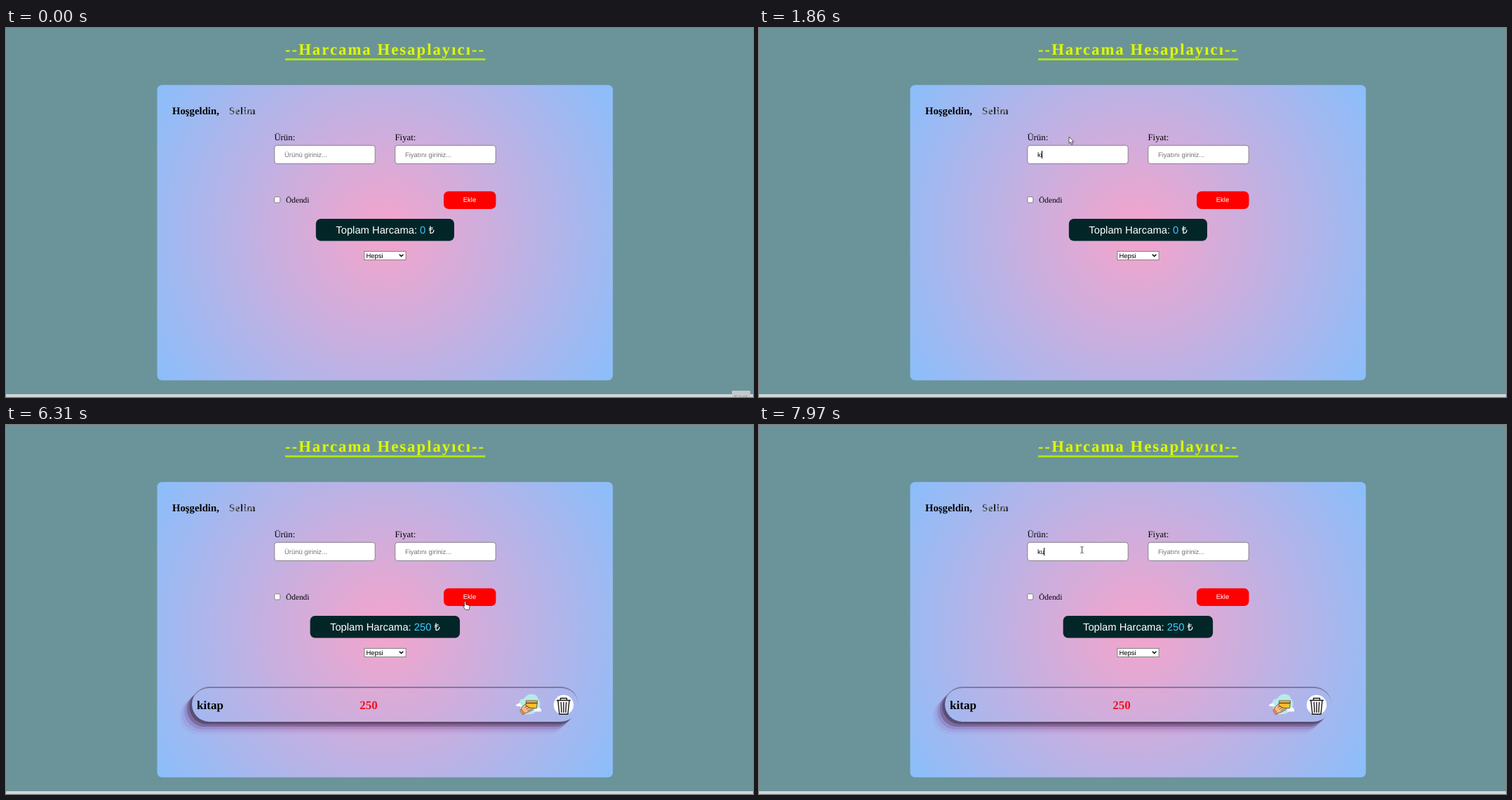
An HTML page for the animation above (8000 ms loop, 1065 by 526 pixels).

```html
<!DOCTYPE html>
<html lang="tr">
<head>
<meta charset="utf-8">
<title>Harcama Hesaplayıcı</title>
<style>
  html, body { margin: 0; width: 100%; height: 100%; overflow: hidden; background: #6a9499; }
  svg { position: absolute; left: 0; top: 0; }
  text { white-space: pre; text-rendering: geometricPrecision; }
  .serif { font-family: "Liberation Serif", "Times New Roman", serif; }
  .sans { font-family: "Liberation Sans", Arial, sans-serif; font-size: 9.46px; }
  .menu { font-family: "Open Sans", "Noto Sans", sans-serif; font-size: 8.5px; fill: #3a3a3a; }
  .bold { font-weight: bold; }
  .title { text-shadow: 0 0 5px rgba(165, 180, 70, .4); }
  .field { fill: #fff; stroke: #7b7681; stroke-width: .9; }
  .hint { fill: #757575; }
  #pill {
    position: absolute; left: 265px; top: 373px; width: 551px; height: 50px;
    box-sizing: border-box; border-top: 2px solid #7f7a9c; border-radius: 25px;
    box-shadow:
      rgba(46, 36, 50, .42) -3.5px 3.5px, rgba(60, 40, 70, .32) -7.1px 7.1px,
      rgba(110, 50, 120, .2) -10.6px 10.6px, rgba(130, 50, 140, .1) -14.2px 14.2px,
      rgba(130, 50, 140, .06) -17.7px 17.7px;
  }
</style>
</head>
<body>
<svg width="1065" height="526" viewBox="0 0 1065 526">
  <defs>
    <radialGradient id="glow" gradientUnits="userSpaceOnUse" cx="540.3" cy="291.5" r="387">
      <stop offset="0" stop-color="#f5a4cb"/>
      <stop offset="1" stop-color="#8abefb"/>
    </radialGradient>
    <linearGradient id="patchy" gradientUnits="userSpaceOnUse" x1="318" y1="113" x2="325" y2="118" spreadMethod="reflect">
      <stop offset="0" stop-color="#1b1d22"/>
      <stop offset=".4" stop-color="#34363c"/>
      <stop offset=".7" stop-color="#8a8f98"/>
      <stop offset="1" stop-color="#25272b"/>
    </linearGradient>
  </defs>

  <text class="serif bold title" x="398" y="38" font-size="22.72" letter-spacing="2.02" fill="#dcfa05">--Harcama Hesaplayıcı--</text>
  <rect x="398" y="43.3" width="285.4" height="2.8" fill="#b3e510"/>

  <rect x="215.5" y="81.3" width="649.7" height="421" rx="7" fill="url(#glow)"/>
  <text class="serif bold" x="237" y="123" font-size="14.77">Hoşgeldin,</text>
  <text class="serif bold" x="318" y="123" font-size="14.77" letter-spacing=".6" fill="url(#patchy)">Selim</text>

  <g class="serif" font-size="12.78">
    <text x="382.4" y="160.4">Ürün:</text>
    <text x="554.5" y="160.4">Fiyat:</text>
  </g>
  <rect class="field" x="382.8" y="167.3" width="143.4" height="26.2" rx="3.5"/>
  <rect class="field" x="554.8" y="167.3" width="143.4" height="26.2" rx="3.5"/>
  <text class="sans" id="item" x="397" y="183.6"></text>
  <text class="sans" id="price" x="569" y="183.6"></text>
  <g id="spin">
    <rect x="673" y="175.5" width="10.5" height="10.5" fill="#efefef"/>
    <path d="M675.3 179.8l3-3 3 3zM675.3 182l3 3 3-3z" fill="#4a4a4a"/>
  </g>
  <path id="caret" d="M0 175v11" stroke="#000" stroke-width="1"/>

  <rect x="382.8" y="240.7" width="8" height="8.3" rx="1.8" fill="#fff" stroke="#767676" stroke-width=".9"/>
  <text class="serif" x="399" y="249" font-size="11.36">Ödendi</text>
  <rect x="624" y="232.8" width="74.5" height="25.2" rx="7" fill="#f00"/>
  <text class="sans" x="661" y="248" text-anchor="middle" fill="#fff">Ekle</text>

  <rect id="totalBox" y="272" height="31.6" rx="7" fill="#022628"/>
  <text class="sans" id="total" y="292.5" fill="#fff" style="font-size:14.77px">Toplam Harcama: <tspan id="sum" fill="#4fbcfa"></tspan> ₺</text>

  <rect x="510.9" y="318.4" width="59.2" height="12.2" fill="#fff" stroke="#767676" stroke-width=".9"/>
  <text class="sans" x="513.5" y="327.6">Hepsi</text>
  <path d="M560.8 322.8l2.8 2.8 2.8-2.8" fill="none" stroke="#000" stroke-width="1.4"/>

  <rect y="522" width="1065" height="4" fill="#d3d6d9"/>
  <g id="tip">
    <rect x="1035" y="517" width="26" height="9" fill="#c6c8c9"/>
    <text class="menu" x="1038" y="529" style="fill:#8b8b8b">Kayıt</text>
  </g>

  <g id="menu">
    <g style="filter:drop-shadow(0 1px 1.5px rgba(0,0,0,.35))">
      <path d="M448.5 201l6-6 6 6z" fill="#fff"/>
      <rect x="439.3" y="200.3" width="60" height="158.7" rx="2.5" fill="#fff"/>
    </g>
  </g>
</svg>

<div id="pill"></div>

<svg width="1065" height="526" viewBox="0 0 1065 526">
  <g id="row">
    <g class="serif bold" font-size="17.04">
      <text x="272" y="404.8">kitap</text>
      <text x="504.3" y="404.8" fill="#f3111d">250</text>
    </g>
    <g stroke-linejoin="round" stroke-linecap="round">
      <path d="M733 402q-3-7 1-11q5 0 7-4q5-5 11-3q6 1 6 6q5 4 3 10q0 6-5 7q-3 6-10 5q-8 2-11-4q-2-2-2-6z" fill="#b6eae8"/>
      <path d="M727 400q0-3 3-2.500q2-2 4 .5l3 3h-8zM753 408.500q0-4 4-4q1-3 4-1.500q3 2 2 5.500z" fill="#f4fbfb"/>
      <path d="M734 406q1-5 5-7l4-3 4 3 1 3 4 1-1 3-6 3-5 2-3 1z" fill="#f2bd8a" stroke="#6f4a35" stroke-width=".8"/>
      <path d="M733 406.500l2-1.500 4.500 6-2.500 2z" fill="#f18a48" stroke="#6f4a35" stroke-width=".5"/>
      <path d="M742 393h15.500l-1 10.500h-8.500l-6.500-3z" fill="#ffc22e" stroke="#6f4a35" stroke-width=".9"/>
      <path d="M742 396.300h15" stroke="#6f4a35" stroke-width="1.7"/>
      <path d="M740 402.500l4-2M742 405l5-2.500M744 407.500l5-2.500" fill="none" stroke="#6f4a35" stroke-width=".8"/>
    </g>
    <circle cx="795" cy="399" r="14.2" fill="#fff"/>
    <g fill="none" stroke="#161616" stroke-width="1.4" stroke-linejoin="round" stroke-linecap="round">
      <path d="M785.500 392.500h19M790.500 392v-2.500h9v2.500M787 393.500l2 18.700h12l2-18.700"/>
      <path d="M791.300 395.500l.7 14M795 395.500v14M798.700 395.500l-.7 14"/>
    </g>
  </g>

  <g id="pointer">
    <path id="arrow" d="M0 0v9.600l2.200-2 1.500 3.400 1.700-.7-1.500-3.300h3z" fill="#fff" stroke="#333" stroke-width=".8"/>
    <path id="beam" d="M-2-4.500q2 0 2 1q0-1 2-1M0-3.500v7M-2 4.500q2 0 2-1q0 1 2 1" fill="none" stroke="#333" stroke-width=".9"/>
    <path id="hand" d="M-1 0q1-1 2 0v4l4.500 1.300q1 .4 .8 2l-.8 4.200h-5l-3.200-4.500q0-1.500 1.700-.5z" fill="#fff" stroke="#333" stroke-width=".8"/>
  </g>
</svg>

<script>
const LOOP = 8000, CLICK = 6310;
const $ = id => document.getElementById(id);
const show = (id, on) => { $(id).style.display = on ? '' : 'none'; };

// Each entry holds from its time until the next one.
const ITEM = [[0, ''], [1660, 'k'], [1800, 'ki'], [2260, 'kit'], [2390, 'kita'], [2660, 'kitap'],
  [CLICK, ''], [7710, 'k'], [7910, 'ku']];
const PRICE = [[0, ''], [4450, '2'], [4720, '25'], [4850, '250'], [CLICK, '']];
const CARET = [[0, ''], [870, 'item'], [1330, ''], [1660, 'item'], [3190, ''], [3860, 'price'],
  [4190, ''], [4450, 'price'], [5450, ''], [7180, 'item'], [7640, ''], [7710, 'item']];
const SHAPE = [[0, ''], [70, 'arrow'], [740, 'beam'], [930, 'arrow'], [3500, 'beam'],
  [5560, 'arrow'], [5850, 'hand'], [6440, 'arrow'], [6640, 'beam']];

// Pointer path: time, x, y
const PATH = [[0, 1045, 524], [270, 700, 330], [530, 302, 215], [740, 400, 185], [870, 427, 173],
  [1010, 442, 155], [3190, 442, 155], [3460, 510, 163], [3720, 575, 174], [3860, 582, 175.5],
  [5450, 582, 175.5], [5660, 612, 218], [5930, 652, 266], [6250, 655, 252], [6310, 655, 252],
  [6500, 590, 232], [6640, 500, 200], [6770, 458, 183.5], [7050, 458, 183.5], [7180, 460.5, 178], [LOOP, 460.5, 178]];

['elma', 'sdfsdf', '250', 'telefon', '100', 'alca'].forEach((word, i) => {
  const line = document.createElementNS('http://www.w3.org/2000/svg', 'text');
  line.setAttribute('class', 'menu');
  line.setAttribute('x', 447.8);
  line.setAttribute('y', 219.6 + i * 25.4);
  line.textContent = word;
  $('menu').append(line);
});

const held = (table, t) => table.findLast(step => step[0] <= t)[1];

function along(path, t) {
  const i = Math.max(1, path.findIndex(p => p[0] > t));
  const [t0, x0, y0] = path[i - 1], [t1, x1, y1] = path[i];
  const k = (t - t0) / (t1 - t0);
  return [x0 + (x1 - x0) * k, y0 + (y1 - y0) * k];
}

function fill(id, value, hint) {
  const el = $(id);
  const text = value || hint;
  if (el.textContent !== text) el.textContent = text;
  el.classList.toggle('hint', !value);
}

function draw(t) {
  const item = held(ITEM, t), price = held(PRICE, t);
  fill('item', item, 'Ürünü giriniz...');
  fill('price', price, 'Fiyatını giriniz...');

  const focus = held(CARET, t);
  show('caret', focus);
  if (focus) {
    const el = $(focus);
    const typed = focus === 'item' ? item : price;
    const x = el.x.baseVal[0].value + (typed ? el.getComputedTextLength() : 0);
    $('caret').setAttribute('transform', `translate(${Math.floor(x) + .5})`);
  }

  const added = t >= CLICK;
  $('sum').textContent = added ? '250' : '0';
  $('sum').setAttribute('fill', added ? '#43cdfc' : '#4fbcfa');
  $('total').setAttribute('x', added ? 462 : 470.3);
  $('totalBox').setAttribute('x', added ? 433.6 : 441.8);
  $('totalBox').setAttribute('width', added ? 213.5 : 197.2);
  show('row', added);
  show('pill', added);
  show('tip', t < 70);
  show('menu', t >= 870 && t < 1660);
  show('spin', t >= 3590 && t < CLICK);

  const shape = held(SHAPE, t);
  for (const id of ['arrow', 'beam', 'hand']) show(id, id === shape);
  const [x, y] = along(PATH, t);
  $('pointer').setAttribute('transform', `translate(${x} ${y})`);
}

const start = performance.now();
function frame() {
  draw((performance.now() - start) % LOOP);
  requestAnimationFrame(frame);
}
frame();
</script>
</body>
</html>
```
